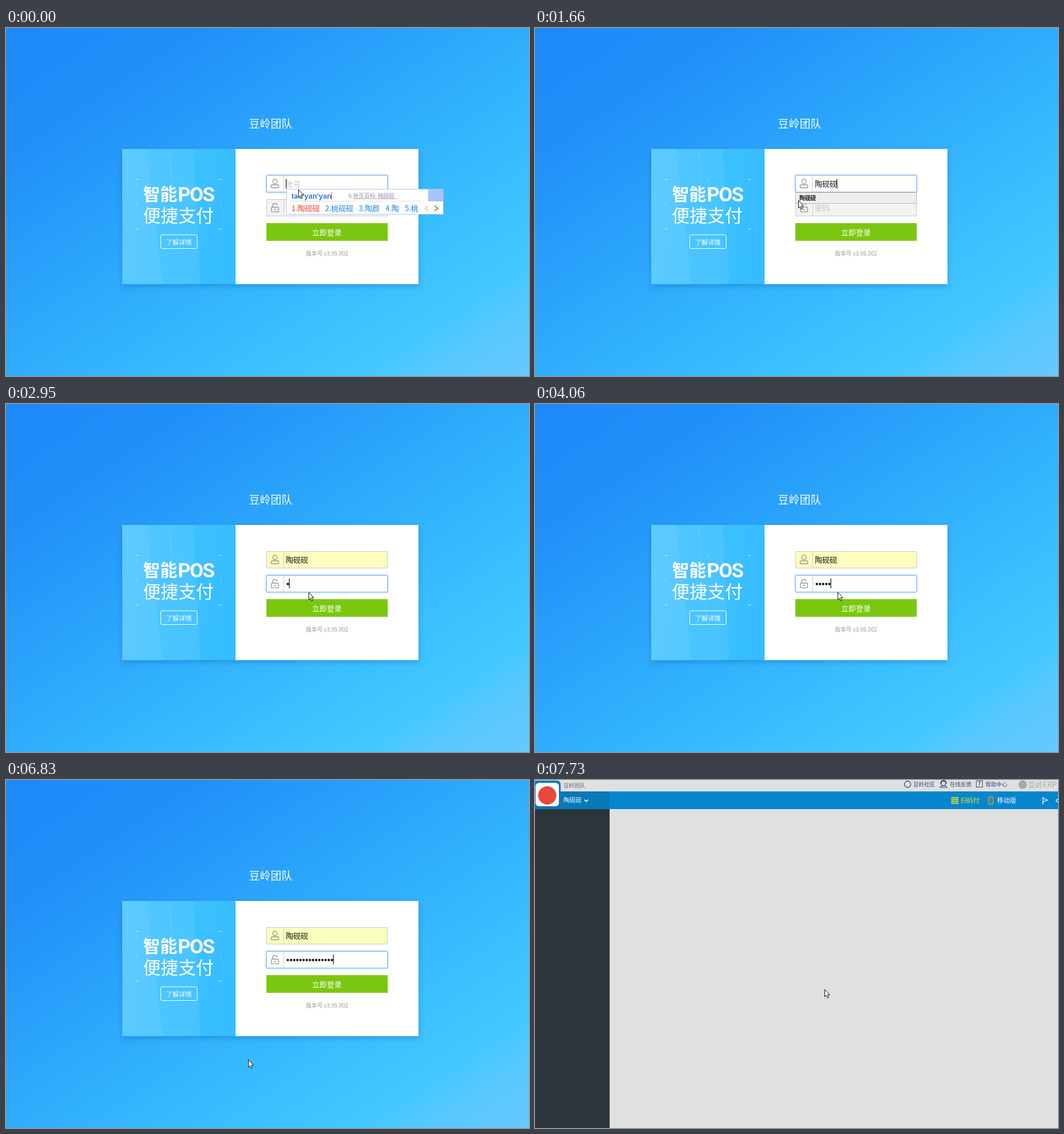
Recreate the animation shown at these times as an HTML page. Size 918 by 610 pixels, loop 8 s.

```html
<!DOCTYPE html>
<html lang="zh-CN">
<head>
<meta charset="utf-8">
<title>登录</title>
<style>
html, body { margin: 0; width: 100%; height: 100%; overflow: hidden; background: #2ba6fb; }
svg { display: block; width: 918px; height: 610px; font-family: "Noto Sans CJK SC", "Noto Sans CJK", sans-serif; }
.latin { font-family: "Liberation Sans", sans-serif; }
.lettering { font-family: Roboto, "Open Sans", sans-serif; }
text { white-space: pre; }
.panel { filter: drop-shadow(0 4px 5px rgba(0, 70, 140, .28)); }
.focus { filter: drop-shadow(0 0 2px rgba(80, 165, 245, .75)); }
</style>
</head>
<body>
<svg id="stage" viewBox="0 0 918 610" xmlns="http://www.w3.org/2000/svg"></svg>
<script>
const USER = '陶砚砚', TEAM = '豆岭';
const LOOP = 8000;

// Text is placed by its left edge and vertical centre.
const text = (x, cy, size, fill, str, attrs = '') =>
  `<text x="${x}" y="${cy + size * .38}" font-size="${size}" fill="${fill}" ${attrs}>${str}</text>`;
const rect = (x, y, w, h, fill, attrs = '') =>
  `<rect x="${x}" y="${y}" width="${w}" height="${h}" fill="${fill}" ${attrs}/>`;
const line = (d, stroke, width = 1, attrs = '') =>
  `<path d="${d}" fill="none" stroke="${stroke}" stroke-width="${width}" ${attrs}/>`;
const group = (id, body) => `<g id="${id}">${body}</g>`;
const middle = 'text-anchor="middle"';

const gradient = (id, x2, y2, stops) =>
  `<linearGradient id="${id}" x1="0" y1="0" x2="${x2}" y2="${y2}">` +
  stops.map(([o, c]) => `<stop offset="${o}" stop-color="${c}"/>`).join('') + '</linearGradient>';

const defs = '<defs>' +
  gradient('sky', 1, 1, [[0, '#1e89f8'], [.18, '#208ff9'], [.5, '#2fadfc'], [.72, '#3bc0ff'],
    [.84, '#43c8ff'], [.9, '#58c8ff'], [1, '#66c8ff']]) +
  gradient('promo', 1, .15, [[0, '#4bc3ff'], [.5, '#40c1ff'], [1, '#36bdff']]) + '</defs>';

const rays = [[204, 247, 275, 204], [204, 288, 307, 204], [284, 330, 341, 307]]
  .map(([a, b, c, d]) => `<path d="M${a} 212H${b}L${c} 449H${d}Z" fill="#fff" opacity=".06"/>`).join('');
const corners = [[228.5, 265.5], [374.5, 265.5], [228.5, 352.5], [374.5, 352.5]]
  .map(([x, y]) => line(`M${x} ${y}h4`, '#fff', 1, 'opacity=".85"')).join('') +
  line('M301 265.5h4M229 307v4M377.5 307v4', '#fff', 1, 'opacity=".4"');

const promo = rect(204, 212, 199, 237, 'url(#promo)') + rays + corners +
  text(240.5, 291, 30, '#fff', '智能', 'font-weight="700"') +
  `<text class="lettering" x="301.5" y="304" font-size="35" font-weight="700" letter-spacing="-1.6" fill="#fff">POS</text>` +
  text(240.5, 328, 31, '#fff', '便捷支付', 'font-weight="200"') +
  rect(271.5, 362.5, 64, 24, 'none', 'rx="2.5" stroke="#fff"') +
  text(303.5, 375.5, 11.2, '#fff', '了解详情', middle);

const field = (id, y, icon) => group(id,
  rect(457.5, y + .5, 212, 29, '#fff', `id="${id}Box" stroke="#ccc"`) +
  line(`M487.5 ${y + 1}v28`, '#ccc') + icon);

const personIcon = '<g fill="none" stroke="#999" stroke-width="1.4"><circle cx="472" cy="269" r="4"/>' +
  '<rect x="465.2" y="274.7" width="13.6" height="5.6" rx="2.8"/></g>';
const lockIcon = '<g fill="none" stroke="#999" stroke-width="1.4"><rect x="466" y="314" width="12.4" height="8.4" rx="1"/>' +
  '<path d="M467.8 314v-2.2a4.2 4.2 0 0 1 8.2-1.4M470 318.2h4.4"/></g>';

const suggestions = group('suggestions',
  rect(457.5, 288.5, 212, 19, '#fff', 'id="suggestionBox" stroke="#b9b9b9"') +
  text(464, 298.5, 9.7, '#111', USER, 'font-weight="700"'));

const candidates = [[501, USER, '#f03c28'], [560, '桃砚砚'], [619, '陶颜'], [666, '陶'], [700, '桃']]
  .map(([x, word, color = '#1c83dc'], i) => text(x, 316, 13, color, `${i + 1}.${word}`)).join('');
const ime = group('ime',
  rect(492.5, 282.5, 275, 44, '#fff', 'stroke="#a9cdf5"') +
  rect(741, 282, 27, 22, '#a5c5f7') +
  line('M499 303.5H728', '#dedede') +
  text(501, 294.3, 13, '#2d74e8', "tao'yan'yan", 'class="latin" font-weight="700"') +
  line('M571.5 288v13', '#f33', 1, 'id="imeCaret"') +
  text(601, 294, 9.7, '#8d8d9b', '6.拾页百科: 桃砚砚', 'id="hint"') +
  line('M611 299.5H687', '#b4b4c0') + candidates +
  line('M741.5 311.5l-6 4.5l6 4.5', '#c4c4c4', 1.3) +
  line('M752 311.5l6 4.5l-6 4.5', '#666', 1.5));

const login = group('login',
  rect(0, 0, 918, 610, 'url(#sky)') +
  text(464.5, 168, 19, '#fff', TEAM + '团队', middle) +
  rect(204, 212, 520, 237, '#fff', 'class="panel"') + promo +
  field('user', 258, personIcon) + field('pass', 300, lockIcon) +
  text(491.3, 273, 13, '#111', '', 'id="userText"') +
  text(491.3, 315, 13, '#c4c4c4', '密码', 'id="passHint"') +
  group('dots', Array.from({ length: 15 }, (_, i) =>
    `<circle cx="${494.7 + i * 5.53}" cy="315.6" r="2.1" fill="#111"/>`).join('')) +
  line('M0 0v17', '#111', 1.2, 'id="caret"') +
  suggestions +
  rect(457, 342, 213, 31, '#7bc70f', 'id="button"') +
  text(564.2, 359, 13, '#fff', '', `id="buttonShade" ${middle}`) +
  text(563.2, 358, 13, '#fff', '', `id="buttonText" ${middle}`) +
  text(563.5, 395.5, 9.7, '#999', '版本号 v3.95.002', middle) + ime);

const navy = '#27488a';
const gridIcon = [[731.7, 30.7], [738.2, 30.7], [731.7, 37.2], [738.2, 37.2]]
  .map(([x, y]) => rect(x, y, 4, 4, 'none', 'stroke="#f0ec20" stroke-width="1.4"')).join('');
const home = group('home',
  rect(0, 0, 918, 610, '#e0e0e0') +
  rect(0, 20, 918, 31, '#0586cd') + rect(0, 20, 131, 31, '#0879b9') +
  rect(0, 51, 131, 559, '#2c343c') +
  '<path d="M0 1H38Q45 1 45 8V46H0Z" fill="#0879b9"/>' +
  rect(1, 5, 41, 41, '#fff', 'rx="6"') + '<circle cx="21.5" cy="27" r="16" fill="#e8493c"/>' +
  text(50, 9.5, 9.5, '#666', TEAM + '团队') +
  text(50, 35.5, 10.5, '#fff', USER, 'font-weight="500"') +
  line('M86.5 34.5l3.5 3.2l3.5-3.2', '#fff', 1.6) +
  `<circle cx="654" cy="7.5" r="5.5" fill="none" stroke="${navy}" stroke-width="1.3"/>` +
  text(664, 7.5, 9.5, navy, TEAM + '社区', 'font-weight="500"') +
  `<circle cx="717" cy="6" r="4" fill="none" stroke="${navy}" stroke-width="1.3"/>` +
  line('M712 7V5.5a5 5 0 0 1 10 0V7M711 13q1-3 6-3t6 3z', navy, 1.2) +
  text(728, 7.5, 9.5, navy, '在线反馈', 'font-weight="500"') +
  rect(774.5, 1.5, 11, 11, 'none', `stroke="${navy}"`) +
  text(780, 7, 9, navy, '?', `${middle} font-weight="700"`) +
  text(791, 7.5, 9.5, navy, '帮助中心', 'font-weight="500"') +
  '<circle cx="856" cy="8" r="7.5" fill="#a9a9a9"/>' +
  text(865.5, 8, 13, '#a9a9a9', TEAM + 'ERP', 'font-weight="500"') +
  gridIcon + text(747, 36, 11.1, '#f0ec20', '扫码付', 'font-weight="500"') +
  rect(796, 29.7, 8, 12.6, 'none', 'rx="1" stroke="#e89432" stroke-width="1.5"') +
  line('M798 33h4M798 36h4M799 40h2', '#e89432') +
  text(811, 36, 11.2, '#fff', '移动版', 'font-weight="500"') +
  line('M891.5 30v13M891.5 31.5l8 3.8l-8 3.4', '#fff', 1.2) +
  line('M919 32l-4.5 4l4.5 4', '#fff', 1.2));

const pointer = group('arrow',
  '<path d="M.5.5V13.6L3.4 10.9L5.5 15.6L7.6 14.7L5.5 10.1H9.4Z" fill="#fff" stroke="#111" stroke-width="1"/>') +
  group('beam', line('M-2.5-6.5h2q.5 0 .5.6q0-.6.5-.6h2M0-6v12M-2.5 6.5h2q.5 0 .5-.6q0 .6.5.6h2', '#222', 1.2));

const stage = document.getElementById('stage');
stage.innerHTML = defs + login + home + pointer;
const el = {};
stage.querySelectorAll('[id]').forEach(node => el[node.id] = node);

const show = (node, on) => node.setAttribute('display', on ? 'inline' : 'none');
const paint = (node, fill, stroke) => {
  node.setAttribute('fill', fill);
  if (stroke) node.setAttribute('stroke', stroke);
};
const latest = (track, t) => track.reduce((found, key) => key[0] <= t ? key : found);

const cursorTrack = [[0, 513, 283], [930, 478, 357], [1080, 432, 322], [1390, 443, 308],
  [1540, 462, 302], [1690, 474, 297], [1990, 497, 301], [2140, 515, 317], [2300, 517, 325],
  [2420, 531, 329.5], [6320, 524, 372], [6440, 490, 430], [6560, 440, 490], [6690, 405, 523],
  [6820, 425, 490], [6950, 470, 430], [7080, 506, 375], [7210, 508, 366.5]];
const keyTimes = [2950, 3510, 3680, 3860, 4060, 4210, 4360, 4610, 4770, 4930, 5090, 5250, 5650, 5800, 5950];
const REST = '#ccc', FADING = '#a6c8e8', ACTIVE = '#74b8f4';
const userTrack = [[0, '#fff', ACTIVE], [1690, '#faffbd', ACTIVE], [2300, '#faffbd', FADING], [2420, '#faffbd', REST]];
const passTrack = [[0, '#f3f3f3', REST], [2300, '#fafbfd', FADING], [2420, '#fff', ACTIVE], [7210, '#f3f3f3', REST]];
const buttonTrack = [[0, '立即登录'], [7210, '正在登录...'], [7460, '登录成功...']];

function drawField(name, track, t) {
  const [, fill, stroke] = latest(track, t);
  paint(el[name + 'Box'], fill, stroke);
  el[name + 'Box'].classList.toggle('focus', stroke === ACTIVE);
}

function draw(t) {
  show(el.login, t < 7730);
  show(el.home, t >= 7730);

  drawField('user', userTrack, t);
  drawField('pass', passTrack, t);
  show(el.ime, t < 400);
  show(el.imeCaret, t < 120);
  paint(el.hint, t < 120 ? '#8d8d9b' : '#777785');
  el.userText.textContent = t < 400 ? '账号' : USER;
  paint(el.userText, t < 400 ? '#c4c4c4' : '#111');
  show(el.suggestions, t >= 400 && t < 1840);
  paint(el.suggestionBox, t >= 1540 ? '#eee' : '#fff');

  const typed = keyTimes.filter(k => k <= t).length;
  show(el.passHint, !typed);
  [...el.dots.children].forEach((dot, i) => show(dot, i < typed));

  const inPass = t >= 2300;
  const caretX = inPass ? 491.7 + typed * 5.53 : t < 400 ? 491.7 : 530;
  el.caret.setAttribute('transform', `translate(${caretX} ${inPass ? 306 : 264.5})`);
  show(el.caret, t < 120 || (t >= 400 && t < 930) || (t >= 1390 && t < 1990) || (inPass && t < 7210));

  const [, label] = latest(buttonTrack, t);
  const busy = t >= 7210;
  paint(el.button, busy ? '#c9cacb' : '#7bc70f');
  paint(el.buttonText, busy ? '#999' : '#fff');
  el.buttonText.textContent = label;
  el.buttonShade.textContent = busy ? label : '';

  const [, x, y] = latest(cursorTrack, t);
  const overText = t >= 1990 && t < 2420;
  show(el.arrow, !overText);
  show(el.beam, overText);
  (overText ? el.beam : el.arrow).setAttribute('transform', `translate(${x} ${y})`);
}

const start = performance.now();
function tick() {
  draw((performance.now() - start) % LOOP);
  requestAnimationFrame(tick);
}
tick();
</script>
</body>
</html>
```
